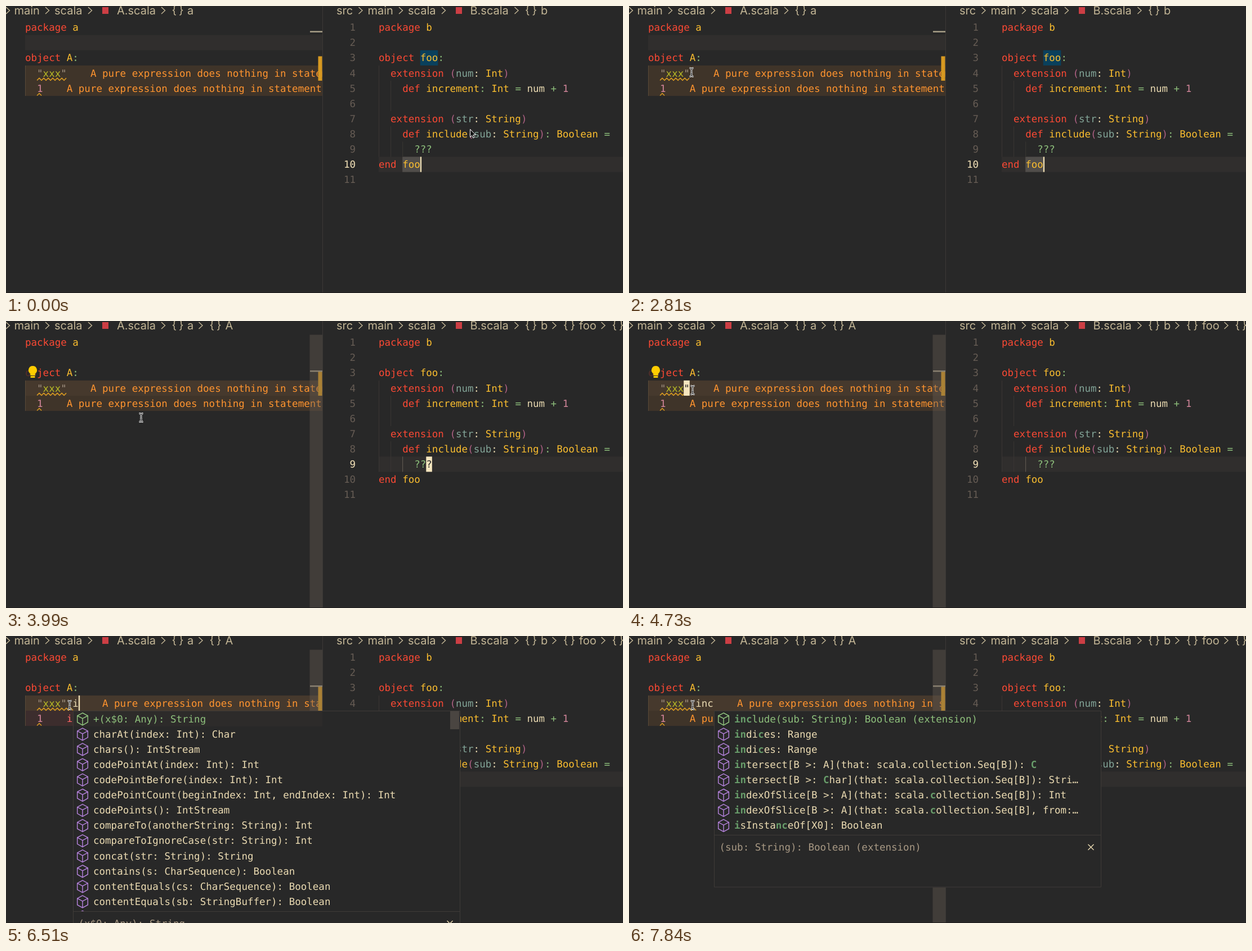
An HTML page for the animation above (8 s loop, 1096 by 511 pixels).

```html
<!DOCTYPE html>
<html lang="en">
<head>
<meta charset="utf-8">
<title>Editor completion</title>
<style>
  html, body { margin: 0; width: 100%; height: 100%; overflow: hidden; background: #282828; }
  svg { display: block; }
  #stage { width: 100vw; height: 100vh; }
  text { font: 17.5px "DejaVu Sans Mono", monospace; white-space: pre; text-rendering: geometricPrecision; }
  text.crumb { font: 20px Inter, sans-serif; fill: #c2b595; }
  text.brace { letter-spacing: 4px; }
  path { fill: none; }
</style>
</head>
<body>
<svg id="stage" viewBox="0 0 1096 511"></svg>
<script>
const LOOP = 8000, CHAR = 10.536, LINE = 27.1, TOP = 24.6, BASE = 19.6;
const LEFT = 34, RIGHT = 662;
const colors = {
  r: '#fb4934', y: '#fabd2f', f: '#ebdbb2', g: '#b8bb26', a: '#8ec07c', p: '#d3869b',
  m: '#b16286', b: '#83a598', q: '#a09080', w: '#ff942f', e: '#ff6464', k: '#282828',
  n: '#665c54', d: '#a89984', h: '#689d6a', c: '#f5e5be'
};

const lineTop = line => TOP + (line - 1) * LINE;
const at = (from, to, body) => `<g data-from="${from}" data-to="${to}">${body}</g>`;
const rect = (x, y, w, h, fill) => `<rect x="${x}" y="${y}" width="${w}" height="${h}" fill="${fill}"/>`;
const path = (d, stroke, width = 1) => `<path d="${d}" stroke="${stroke}" stroke-width="${width}"/>`;

// "{r}word {y}word" switches colour at each tag.
function text(x, y, source, attrs = '') {
  const parts = source.split(/\{(\w)\}/);
  let spans = parts[0];
  for (let i = 1; i < parts.length; i += 2) {
    const weight = parts[i] === 'h' ? ' font-weight="bold"' : '';
    spans += `<tspan fill="${colors[parts[i]]}"${weight}>${parts[i + 1]}</tspan>`;
  }
  return `<text x="${x}" y="${y}" fill="${colors.f}" ${attrs}>${spans}</text>`;
}
const code = (x, line, col, source) => text(x + col * CHAR, lineTop(line) + BASE, source);
const cells = (x, line, col, count, fill) => rect(x + col * CHAR, lineTop(line), count * CHAR, LINE, fill);
const caret = (x, line, col) => rect(x + col * CHAR, lineTop(line), 2.4, LINE, colors.f);
const block = (x, line, col, ch) => cells(x, line, col, 1, colors.c) + code(x, line, col, '{k}' + ch);
const guide = (x, from, to, fill = '#3a3634') => rect(x, lineTop(from), 1, (to - from + 1) * LINE, fill);

function squiggle(line, cols, color) {
  const x = LEFT + 2 * CHAR, y = lineTop(line) + 24.5, end = cols * CHAR;
  let d = `M${x} ${y + 2}`;
  for (let i = 0; i + 4 <= end + 1; i += 4) d += `l4 ${i % 8 ? 4 : -4}`;
  return path(d, color, 1.5);
}

const crumb = (x, label) => `<text class="crumb" x="${x}" y="15">${label}</text>`;
const brace = x => `<text class="crumb brace" x="${x}" y="14">{}</text>`;
const chevron = x => path(`M${x - 3} 2l6.5 6-6.5 6`, '#c2b595', 1.4);
const badge = x => rect(x, 2, 11, 12, '#cc3e44');

function leftPane() {
  const warning = 'A pure expression does nothing in statement position';
  const tint = '#ff942f1b', redTint = '#e454541b';
  const row = (line, fill) => rect(LEFT, lineTop(line), 528, LINE, fill);
  const typed = [[0, 5330, ''], [5330, 6510, '.'], [6510, 6660, '.i'], [6660, 7400, '.in'], [7400, LOOP, '.inc']];
  const carets = [[5180, 5330, 7], [5330, 6510, 8], [6510, 6660, 9], [6660, 7100, 10], [7400, 7840, 11]];
  const okLine = row(5, tint) + code(LEFT, 5, 7, '{w}' + warning);
  const quote = block(LEFT, 4, 6, '"');
  const bulb = rect(35, 79, 20.5, 26, '#282828c8') +
    '<path d="M47.5 80a7.6 7.6 0 0 0-4.3 13.8V97h8.6v-3.2A7.6 7.6 0 0 0 47.5 80Z" style="fill:#fc0"/>' +
    rect(43.6, 98, 7.8, 3, '#fc0');
  return '<svg width="562" height="511">' +
    at(0, 2960, row(2, '#302e2d')) +
    at(2960, LOOP, row(4, '#302e2d')) +
    row(4, tint) +
    at(0, 5620, okLine) +
    at(5620, 6810, row(5, redTint) + code(LEFT, 5, 7, '{e}identifier expected but integer constant found')) +
    at(6810, LOOP, okLine) +
    guide(LEFT, 4, 5, '#594a38') +
    code(LEFT, 1, 0, '{r}package {y}a') +
    code(LEFT, 3, 0, '{r}object {y}A{a}:') +
    code(LEFT, 4, 2, '{q}"{g}xxx{q}"') +
    code(LEFT, 5, 2, '{p}1') +
    typed.map(([from, to, s]) => at(from, to,
      code(LEFT, 4, 7, s) + code(LEFT, 4, 11 + s.length, '{w}' + warning))).join('') +
    at(0, 6510, squiggle(4, 5, '#d79921')) +
    at(6510, LOOP, squiggle(4, 6, '#d79921')) +
    at(0, 5620, squiggle(5, 1, '#d79921')) +
    at(5620, 6510, squiggle(5, 1, '#fb4934')) +
    at(6510, LOOP, squiggle(5, 1, '#d79921')) +
    at(2960, 3700, quote) + at(4440, 5180, quote) +
    carets.map(([from, to, col]) => at(from, to, caret(LEFT, 4, col))).join('') +
    at(3100, 6060, bulb) +
    rect(554.5, 89.5, 7, 43.5, '#d79921') +
    at(5620, 6510, rect(554.5, 112, 7, 21, '#e04a3c')) +
    at(0, 2960, rect(540, 44.5, 22, 2.5, '#a89f88')) +
    at(2960, LOOP, rect(540, 88, 22, 2.5, '#a09783') + rect(539.5, 24.5, 23, 487, '#665c5466')) +
    chevron(3) + crumb(14.5, 'main') + chevron(73) + crumb(86, 'scala') + chevron(149) +
    badge(171) + crumb(197, 'A.scala') + chevron(279) + brace(294.5) + crumb(322, 'a') +
    at(3100, LOOP, chevron(345.5) + brace(361.5) + crumb(389.5, 'A')) +
    '</svg>';
}

function rightPane() {
  const lines = [
    '{r}package {y}b', '', '{r}object {y}foo{a}:',
    '  {r}extension {m}({b}num{f}: {y}Int{m})',
    '    {r}def {y}increment{a}: {y}Int {a}= {f}num {a}+ {p}1', '',
    '  {r}extension {m}({b}str{f}: {y}String{m})',
    '    {r}def {y}include{m}({b}sub{f}: {y}String{m}){a}: {y}Boolean {a}=',
    '      {a}???', '{r}end {y}foo', ''
  ];
  const number = (n, tag) => text(621, lineTop(n) + BASE, `{${tag}}${n}`, 'text-anchor="end"');
  const row = line => rect(RIGHT, lineTop(line), 434, LINE, '#302e2d');
  const inner = RIGHT + 2 * CHAR, deep = RIGHT + 4 * CHAR;
  return at(0, 3700, row(10) + cells(RIGHT, 3, 7, 3, '#0a405c') + cells(RIGHT, 10, 4, 3, '#504d4a')) +
    at(3700, LOOP, row(9)) +
    guide(RIGHT, 4, 9) + guide(inner, 5, 6) + guide(inner, 8, 9) + guide(deep, 9, 9) +
    at(3700, LOOP, guide(deep, 9, 9, '#665c54')) +
    lines.map((s, i) => code(RIGHT, i + 1, 0, s) + number(i + 1, 'n')).join('') +
    at(0, 3700, number(10, 'f')) + at(3700, LOOP, number(9, 'f')) +
    at(0, 2960, caret(RIGHT, 10, 7)) +
    at(3700, 4440, block(RIGHT, 9, 8, '?')) +
    crumb(587, 'src') + chevron(629.5) + crumb(642.5, 'main') + chevron(701) + crumb(714, 'scala') +
    chevron(777) + badge(799) + crumb(824.5, 'B.scala') + chevron(906.5) + brace(922) + crumb(950, 'b') +
    at(3840, LOOP, chevron(973.5) + brace(990) + crumb(1018, 'foo') + chevron(1060.5) + brace(1076.5));
}

// Matched letters stand between asterisks.
function popup(x, rows, split, bottom, detail, scrolls) {
  const y = 134, w = 687, edge = '#3f3b38';
  const item = (s, i) => {
    const tag = i ? '{f}' : '{a}', rowY = y + i * LINE, cx = x + 17, cy = rowY + 14;
    const label = tag + s.split('*').map((part, k) => k % 2 ? '{h}' + part + tag : part).join('');
    const cube = `M${cx} ${cy - 11}l9.3 5v11.5l-9.3 5.3-9.3-5.3V${cy - 6}ZM${cx - 9.3} ${cy - 6}l9.3 5 9.3-5M${cx} ${cy - 1}V${cy + 10.8}`;
    return path(cube, i ? '#b180d7' : colors.a, 1.5) + text(x + 36, rowY + BASE, label);
  };
  return rect(x, y, w, bottom - y, '#282828') +
    (scrolls ? rect(x, y, 562 - x, LINE, '#2d2b2a') : '') +
    rows.map(item).join('') +
    (scrolls ? rect(x + 670, y, 16, 32, '#4a4541') : '') +
    rect(x, split, w, bottom - split, '#282828') +
    path(`M${x} ${split + .5}h${w}`, edge) +
    path(`M${x + .5} ${y - .5}h${w}V${bottom - .5}h${-w}Z`, edge) +
    text(x + 9.5, split + 27.5, '{d}' + detail) +
    path(`M${x + 664.5} ${split + 17}l10 10m0-10l-10 10`, colors.f, 1.4);
}

const members = [
  '+(x$0: Any): String', 'charAt(index: Int): Char', 'chars(): IntStream', 'codePointAt(index: Int): Int',
  'codePointBefore(index: Int): Int', 'codePointCount(beginIndex: Int, endIndex: Int): Int',
  'codePoints(): IntStream', 'compareTo(anotherString: String): Int', 'compareToIgnoreCase(str: String): Int',
  'concat(str: String): String', 'contains(s: CharSequence): Boolean', 'contentEquals(cs: CharSequence): Boolean',
  'contentEquals(sb: StringBuffer): Boolean', 'endsWith(suffix: String): Boolean'
];
const startingIn = [
  '*in*clude(sub: String): Boolean (extension)', '*in*dexOf(ch: Int): Int', '*in*dexOf(ch: Int, fromIndex: Int): Int',
  '*in*dexOf(str: String): Int', '*in*dexOf(str: String, fromIndex: Int): Int', '*in*tern(): String',
  '*in*dices: Range', '*in*dices: Range', '*in*it: String', '*in*its: Iterator[String]',
  '*in*tersect[B >: A](that: scala.collection.Seq[B]): C', '*in*dexWhere(p: Char => Boolean, from: Int): Int',
  '*in*dexOfSlice[B >: A](that: scala.collection.Seq[B]): Int', '*i*sI*n*stanceOf[X0]: Boolean'
];
const startingInc = [
  '*inc*lude(sub: String): Boolean (extension)', '*in*di*c*es: Range', '*in*di*c*es: Range',
  '*in*tersect[B >: A](that: scala.collection.Seq[B]): *C*',
  '*in*tersect[B >: *C*har](that: scala.collection.Seq[B]): Stri…',
  '*in*dexOfSlice[B >: A](that: scala.*c*ollection.Seq[B]): Int',
  '*in*dexOfSlice[B >: A](that: scala.*c*ollection.Seq[B], from:…',
  '*i*sInsta*nc*eOf[X0]: Boolean'
];
const extensionDetail = '(sub: String): Boolean (extension)';

const beam = 'M-3.5-7.5Q0-7.5 0-5V5Q0 7.5-3.5 7.5M3.5-7.5Q0-7.5 0-5M0 5Q0 7.5 3.5 7.5M-2 3H2';
const stage = document.getElementById('stage');
stage.innerHTML = leftPane() + rightPane() +
  rect(562, 0, 1, 511, '#3c3836') + rect(0, 510, 1096, 1, '#201e1e') +
  at(5920, 6660, popup(119, members, 490, 530, '(x$0: Any): String', true)) +
  at(6660, 7400, popup(140, startingIn, 490, 530, extensionDetail, true)) +
  at(7400, LOOP, popup(151, startingInc, 354, 447.5, extensionDetail, false)) +
  '<g id="pointer">' +
  at(0, 300, '<path d="M0.5 0.5V14.5L3.6 11.6 5.8 16 8 15 5.9 10.6H10.2Z" stroke="#fff" style="fill:#111"/>') +
  at(300, LOOP, path(beam, '#fff', 2.8) + path(beam, '#111', 1)) + '</g>';

// Pointer stops: time, x, y.
const stops = [
  [0, 824, 219], [300, 812, 232], [447, 795, 248], [595, 780, 263], [742, 771, 275], [890, 769, 279],
  [1340, 735, 269], [1485, 560, 228], [1630, 300, 170], [1775, 90, 128], [1920, 22.5, 118],
  [2220, 35, 118], [2367, 60, 118], [2514, 85, 118], [2661, 105, 118], [2810, 111, 118],
  [3400, 450, 200], [3550, 700, 248], [3700, 752, 257], [3840, 560, 228], [3990, 240, 172],
  [4140, 150, 140], [4290, 117, 125], [4580, 113, 123]
];
const cues = [...stage.querySelectorAll('[data-from]')].map(node =>
  ({ node, from: +node.dataset.from, to: +node.dataset.to }));
const pointer = document.getElementById('pointer');

function render(now) {
  const time = now % LOOP;
  for (const { node, from, to } of cues)
    node.style.display = time >= from && time < to ? '' : 'none';
  const [, x, y] = stops.findLast(stop => stop[0] <= time);
  pointer.setAttribute('transform', `translate(${x} ${y})`);
}

const started = performance.now();
function tick() {
  render(Math.max(0, performance.now() - started));
  requestAnimationFrame(tick);
}
tick();
</script>
</body>
</html>
```
